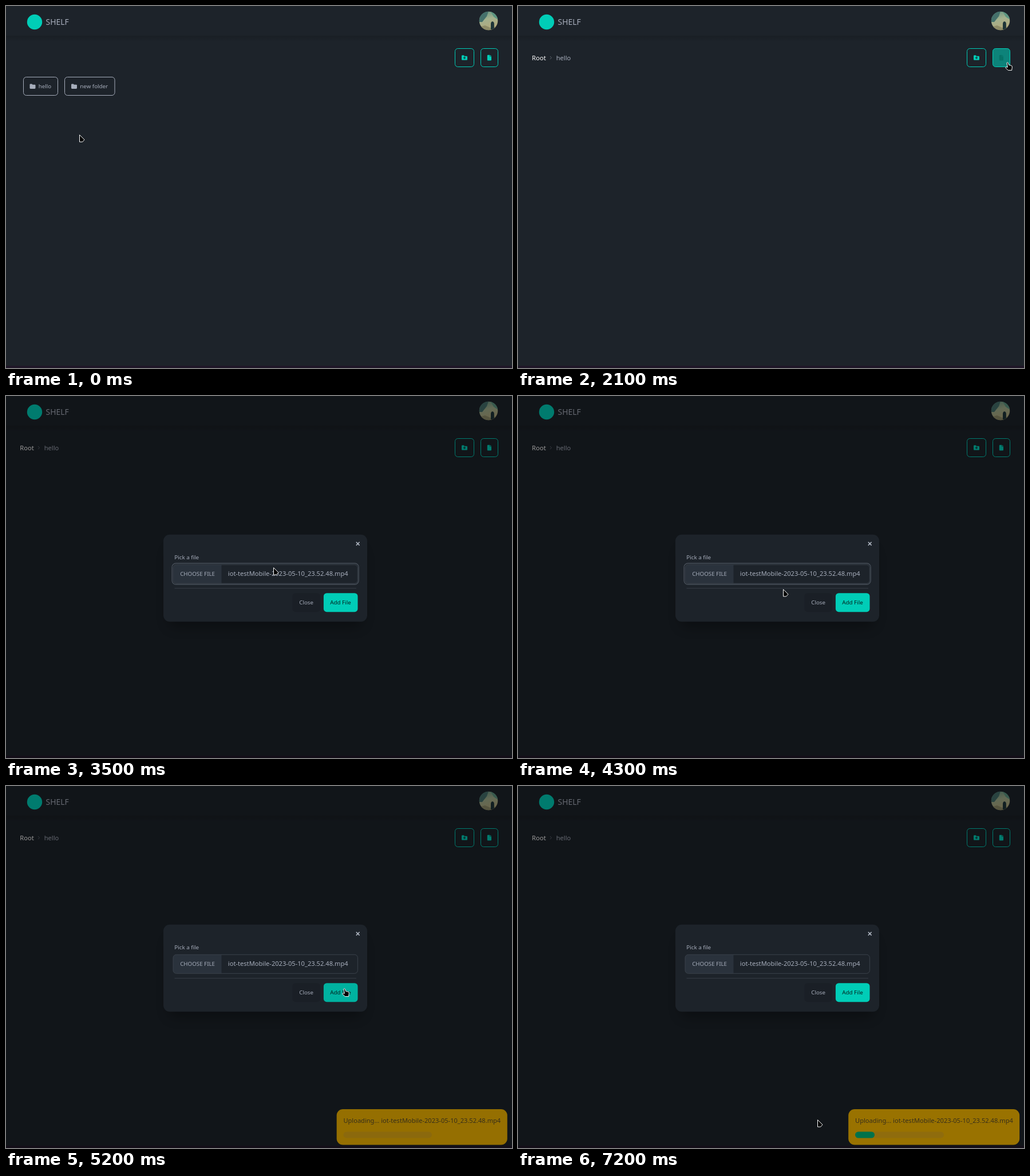
These frames come from a looping animation (884x634 px, 8 s). An HTML page:

```html
<!DOCTYPE html>
<html lang="en">
<head>
<meta charset="utf-8">
<title>File upload</title>
<style>
  html, body { margin: 0; width: 100%; height: 100%; overflow: hidden; background: #1d232a; }
  svg { display: block; width: 884px; height: 634px; }
  text { font-family: "Noto Sans", "Open Sans", sans-serif; font-size: 11.13px; fill: #a6adbb; white-space: pre; }
  .small { font-size: 9.75px; }
  .teal { fill: #00cdb7; }
  .gray { fill: #a6adbb; }
</style>
</head>
<body>
<svg viewBox="0 0 884 634">
  <defs>
    <linearGradient id="fade" x2="0" y2="1">
      <stop offset="0" stop-color="#000" stop-opacity=".13"/>
      <stop offset="1" stop-color="#000" stop-opacity="0"/>
    </linearGradient>
    <linearGradient id="sky" x2=".3" y2="1">
      <stop offset="0" stop-color="#5b8f80"/>
      <stop offset=".5" stop-color="#a3b08d"/>
      <stop offset="1" stop-color="#b3a97c"/>
    </linearGradient>
    <clipPath id="round"><circle cx="843" cy="26" r="16.2"/></clipPath>
    <filter id="soft" x="-20%" y="-40%" width="140%" height="200%"><feGaussianBlur stdDeviation="11"/></filter>
    <path id="folder" d="M0 1.3Q0 0 1.3 0H3.7L5 1.4H8.7Q10 1.4 10 2.7V7.2Q10 8.5 8.7 8.5H1.3Q0 8.5 0 7.2Z"/>
    <path id="file" d="M0 1.2Q0 0 1.2 0H4.4V2.8H7.2V8.4Q7.2 9.6 6 9.6H1.2Q0 9.6 0 8.4ZM5 0L7.2 2.2H5Z"/>
  </defs>

  <rect width="884" height="634" fill="#1d232a"/>
  <rect y="52" width="884" height="11" fill="url(#fade)"/>
  <circle class="teal" cx="50" cy="28" r="13.2"/>
  <text x="69.5" y="33.4" style="font-size:13.9px">SHELF</text>
  <g clip-path="url(#round)">
    <rect x="826" y="9" width="34" height="34" fill="url(#sky)"/>
    <path d="M826 9H843L840 18L836 23L832 28L826 28Z" fill="#44706b"/>
    <path d="M846 9H861V25L852 19Z" fill="#5d9682"/>
    <path d="M826 37L837 34L846 38L861 35V43H826Z" fill="#8f8d68"/>
    <path d="M847 41V31Q847.2 27.5 849.8 27Q852.6 27.5 852.8 31V41Z" fill="#1d3438"/>
  </g>

  <rect x="784.5" y="74.5" width="33" height="32" rx="5" fill="none" stroke="#00cdb7"/>
  <use href="#folder" class="teal" x="796" y="86.3"/>
  <path d="M801 88.6V93M798.8 90.8H803.2" stroke="#1d232a" stroke-width="1.1"/>
  <rect id="fileBtn" x="829.5" y="74.5" width="30" height="32" rx="5" stroke="#00cdb7"/>
  <use id="fileIcon" href="#file" x="840.8" y="85.8"/>

  <g id="home">
    <rect id="helloBtn" x="30.5" y="124.5" width="60" height="32" rx="5" stroke="#a6adbb"/>
    <g id="helloInk">
      <use href="#folder" x="41.5" y="136.4"/>
      <text class="small" x="56.8" y="144" style="fill:inherit">hello</text>
    </g>
    <rect x="102.5" y="124.5" width="87.5" height="32" rx="5" fill="none" stroke="#a6adbb"/>
    <use href="#folder" class="gray" x="114" y="136.4"/>
    <text class="small" x="129.3" y="144">new folder</text>
  </g>
  <g id="inner">
    <text x="24.3" y="94.5" style="fill:#fff">Root</text>
    <path d="M56 88L58.6 90.6L56 93.2" fill="none" stroke="#656c77" stroke-width=".9"/>
    <text x="66.7" y="94.5">hello</text>
  </g>

  <g id="toast">
    <rect x="577.2" y="566" width="299" height="62.5" rx="11" fill="#ffbe00"/>
    <text x="589" y="590" style="fill:#5c4d2c">Uploading... iot-testMobile-2023-05-10_23.52.48.mp4</text>
    <rect x="589" y="605.5" width="155" height="11" rx="5.5" fill="#eeb415"/>
    <rect id="bar" x="589" y="605.5" height="11" rx="5.5" fill="#00bd7c"/>
  </g>
  <rect y="630" width="884" height="4" fill="#1f1728"/>

  <g id="bubble">
    <path d="M0 624H199Q202 624 202 627V634H0Z" fill="#0b0d10"/>
    <text x="0" y="634.9" style="font-size:9.3px;fill:#bcc0c5">localhost:5173/folder/OpwgR53oY12nFVhlyiHF</text>
  </g>

  <rect id="shade" width="884" height="634"/>
  <g id="modal">
    <rect x="284" y="268" width="338" height="136" rx="12" opacity=".32" filter="url(#soft)"/>
    <rect x="275" y="242.7" width="356" height="152.6" rx="11" fill="#1d232a"/>
    <path d="M611.8 255.8L617.6 261.6M617.6 255.8L611.8 261.6" stroke="#b3bac6" stroke-width="1.5"/>
    <text class="small" x="294.3" y="286.3">Pick a file</text>
    <rect id="ring" x="290" y="293" width="326.2" height="37" rx="7" fill="none" stroke="#474f59" stroke-width="1.3"/>
    <path d="M376.5 295.5V328H297.5Q292 328 292 322.5V301Q292 295.5 297.5 295.5Z" fill="#2a323c"/>
    <rect x="292" y="295.3" width="322.4" height="33" rx="5.5" fill="none" stroke="#3a414a"/>
    <text class="small" x="304.2" y="315.3">CHOOSE FILE</text>
    <text x="387.8" y="315.2">iot-testMobile-2023-05-10_23.52.48.mp4</text>
    <path d="M294.5 336.8H612" stroke="#373e46"/>
    <rect x="500.5" y="345.2" width="48.5" height="33" rx="5.5" fill="#1a1f26"/>
    <text class="small" x="512.3" y="365.3">Close</text>
    <rect id="addBtn" x="554.9" y="345.2" width="59.6" height="33" rx="5.5"/>
    <text class="small" x="566.3" y="365.3" style="fill:#04211e">Add File</text>
  </g>

  <g id="cursor" stroke="#fff" stroke-linejoin="round">
    <path id="arrow" d="M.5.7V13H5.6L9 9.2Z"/>
    <path id="hand" d="M3 1.8C3 .6 5 .5 5.4 1.7L6.5 5.4L10.2 6.1Q12.6 6.7 12.3 9L11.6 14.6H5.4L1 10.6Q.3 9 2 8.7L4.4 9.3Z"/>
  </g>
</svg>
<script>
const LOOP = 8000, STEP = 100;
const BASE = [29, 35, 42], TEAL = [0, 205, 183], TEAL_DOWN = [0, 178, 160];
const GRAY = [166, 173, 187], INK = [10, 46, 44];

// Pointer trips: start ms, end ms, where it arrives
const START = [128, 225];
const trips = [
  [100, 700, 51, 148], [1100, 1900, 832, 137], [1900, 2100, 851, 98],
  [2800, 2900, 853, 92], [3000, 3600, 436, 317], [3600, 3900, 419, 328],
  [3900, 4300, 463, 338], [4300, 4500, 587, 354], [5300, 5700, 690, 556],
  [5700, 6100, 801, 612], [6100, 6600, 669, 618], [6600, 6900, 523, 584]
];

const $ = id => document.getElementById(id);
const set = (id, attrs) => { for (const k in attrs) $(id).setAttribute(k, attrs[k]); };
const show = (id, on) => set(id, { visibility: on ? "visible" : "hidden" });
const mix = (a, b, p) => `rgb(${a.map((v, i) => Math.round(v + (b[i] - v) * p))})`;
const zoom = (x, y, s) => `translate(${x} ${y}) scale(${s}) translate(${-x} ${-y})`;
const ramp = (t, a, b) => Math.min(1, Math.max(0, (t - a) / (b - a)));
const smooth = p => p * p * (3 - 2 * p);
const easeOut = p => 1 - (1 - p) ** 2;

function pointer(t) {
  let [x, y] = START;
  for (const [from, to, tx, ty] of trips) {
    const p = smooth(ramp(t, from, to));
    x += (tx - x) * p;
    y += (ty - y) * p;
  }
  return [Math.round(x), Math.round(y)];
}

function draw(t) {
  const within = (a, b) => t >= a && t < b;
  const hello = ramp(t, 400, 600);
  const file = ramp(t, 1930, 2230) - ramp(t, 2750, 3050);
  const add = ramp(t, 4540, 4700) - ramp(t, 5400, 5600);

  show("home", t < 800);
  show("inner", t >= 800);
  set("helloBtn", { fill: mix(BASE, GRAY, hello) });
  set("helloInk", { fill: mix(GRAY, BASE, hello) });
  set("fileBtn", { fill: mix(BASE, TEAL, file) });
  set("fileIcon", { fill: mix(TEAL, INK, file) });
  set("bubble", { opacity: ramp(t, 400, 500) - ramp(t, 1100, 1300) });

  const open = ramp(t, 2770, 3070);
  set("shade", { opacity: .4 * open * open });
  set("modal", { opacity: open, transform: zoom(453, 319, .9 + .1 * open) });
  set("addBtn", { fill: mix(TEAL, TEAL_DOWN, add) });
  show("ring", t < 4900);

  const pop = ramp(t, 5040, 5205);
  set("toast", { opacity: pop, transform: zoom(726.7, 597, .9 + .1 * pop) });
  set("bar", { width: 34 * easeOut(ramp(t, 5300, 6500)) });

  const hand = within(500, 1100) || within(2000, 2800) || within(4600, 5500);
  set("cursor", { transform: `translate(${pointer(t)})` });
  show("hand", hand);
  show("arrow", !hand);
}

// The screen updates ten times a second
function tick() {
  const t = performance.now() % LOOP;
  draw(Math.floor(t / STEP) * STEP);
  requestAnimationFrame(tick);
}
tick();
</script>
</body>
</html>
```
